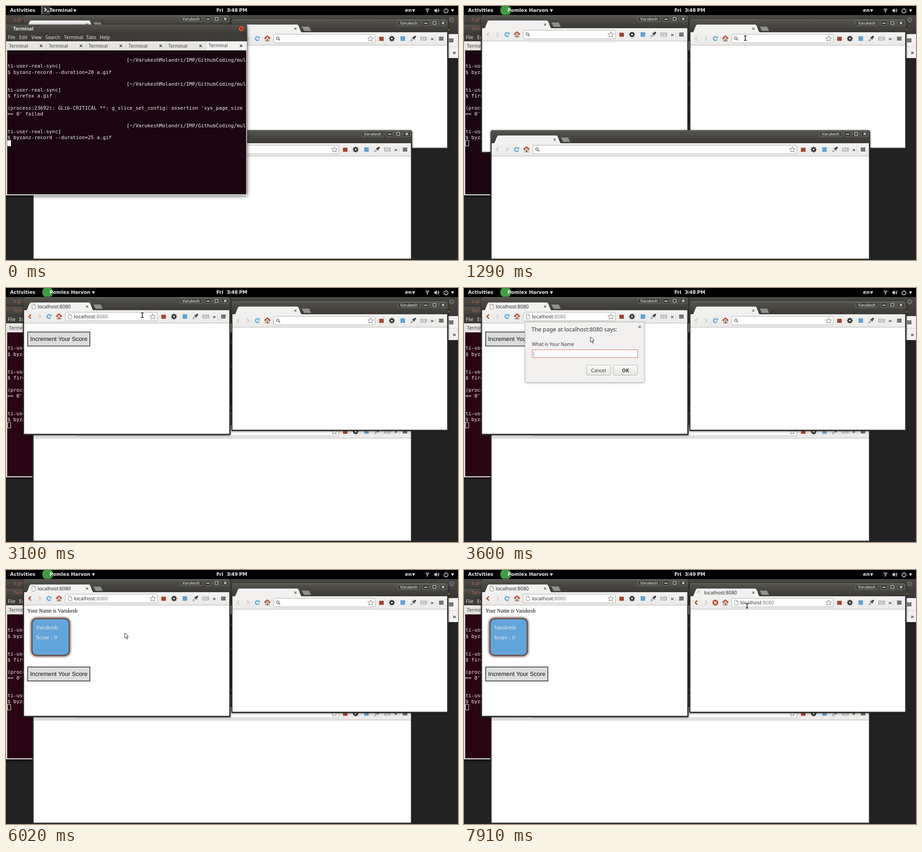
Animation of 998x561 px, one loop 7.99 s. Source, as an HTML page with a canvas:

```html
<!DOCTYPE html>
<html lang="en">
<head>
<meta charset="utf-8">
<title>Desktop recording</title>
<style>
html, body { margin: 0; width: 100%; height: 100%; overflow: hidden; background: #222; }
canvas { display: block; width: 100vw; height: 100vh; }
</style>
</head>
<body>
<canvas id="stage" width="998" height="561"></canvas>
<script>
const c = document.getElementById('stage').getContext('2d');
const LOOP = 7990;
const USER = 'Varukesh', APP = 'Pomlex Harvon';
const UI = '"Noto Sans", "Open Sans", sans-serif';
const BAR = 'bold 10.6px "DejaVu Sans", sans-serif';
const MONO = '10.93px "DejaVu Sans Mono", monospace';
const SERIF = '"Liberation Serif", serif';
const DARK = '#3c3b37', LIGHT = '#f2f1f0', ORANGE = '#b9512b';

// Moments of the story, in ms
const T = { raise: 400, clickRight: 1380, clickLeft: 2520, suggest: 2740, load: 3100, ask: 3180,
  minute: 4390, close: 5450, card: 5510, focusRight: 7000, suggestRight: 7430, loadRight: 7710 };
const KEYS = [4540, 4690, 4890, 4950, 5010, 5070, 5130, 5190];
const POINTER = [[890, 606, 230], [1290, 621, 71], [1780, 621, 71], [2400, 301, 61], [2560, 301, 60],
  [3470, 301, 60], [3680, 266, 137], [3880, 266, 137], [4080, 263, 142], [5450, 263, 142],
  [5500, 262, 139], [6050, 262, 139], [6180, 571, 93], [6390, 571, 93], [6760, 622, 71], [7050, 625, 79]];

const ramp = (t, a, b) => Math.min(1, Math.max(0, (t - a) / (b - a)));

function rect(x, y, w, h, fill, stroke) {
  if (fill) { c.fillStyle = fill; c.fillRect(x, y, w, h); }
  if (stroke) { c.strokeStyle = stroke; c.lineWidth = 1; c.strokeRect(x + .5, y + .5, w - 1, h - 1); }
}
function round(x, y, w, h, r, fill, stroke, width = 1) {
  c.beginPath(); c.roundRect(x, y, w, h, r);
  if (fill) { c.fillStyle = fill; c.fill(); }
  if (stroke) { c.strokeStyle = stroke; c.lineWidth = width; c.stroke(); }
}
function text(s, x, y, font, color, align = 'left') {
  c.font = font; c.fillStyle = color; c.textAlign = align;
  c.fillText(s, x, y);
}
function path(points, stroke, width, fill) {
  c.beginPath();
  for (let i = 0; i < points.length; i += 2) c.lineTo(points[i], points[i + 1]);
  if (fill) { c.closePath(); c.fillStyle = fill; c.fill(); }
  if (stroke) { c.strokeStyle = stroke; c.lineWidth = width; c.stroke(); }
}
function arc(x, y, r, a, b, stroke, width) {
  c.beginPath(); c.arc(x, y, r, a, b); c.strokeStyle = stroke; c.lineWidth = width; c.stroke();
}
function disc(x, y, r, fill) {
  c.beginPath(); c.arc(x, y, r, 0, 7); c.fillStyle = fill; c.fill();
}
function cross(x, y, r, color, width = 1.4) {
  path([x - r, y - r, x + r, y + r], color, width);
  path([x - r, y + r, x + r, y - r], color, width);
}
function vertical(y, h, top, bottom) {
  const g = c.createLinearGradient(0, y, 0, y + h);
  g.addColorStop(0, top); g.addColorStop(1, bottom);
  return g;
}
function shadowed(color, blur, dy, draw) {
  c.save();
  c.shadowColor = color; c.shadowBlur = blur; c.shadowOffsetY = dy;
  draw();
  c.restore();
}
function at(x, y, draw) { c.save(); c.translate(x, y); draw(); c.restore(); }
function menuLines(x, y) { for (const d of [-4, -1, 2]) rect(x - 5, y + d, 10, 2, '#3b3b3b'); }
const triangle = (x, y, color) => path([x - 3.5, y - 2.5, x + 3.5, y - 2.5, x, y + 3.5], null, 0, color);

function pageIcon(x, y) {
  path([x - 3.5, y - 5.5, x + 1, y - 5.5, x + 4, y - 2.5, x + 4, y + 5.5, x - 3.5, y + 5.5, x - 3.5, y - 5.5], '#8d8d8d', 1, '#fff');
  path([x + 1, y - 5.5, x + 1, y - 2.5, x + 4, y - 2.5], '#8d8d8d', 1);
}
function star(x, y) {
  const p = [];
  for (let i = 0; i <= 10; i++) {
    const r = i % 2 ? 3 : 6.8, a = i * Math.PI / 5 - Math.PI / 2;
    p.push(x + r * Math.cos(a), y + r * Math.sin(a));
  }
  path(p, '#777', 1, '#fff');
}
function gear(x, y) {
  for (let i = 0; i < 8; i++) at(x, y, () => { c.rotate(i * Math.PI / 4); rect(-1.3, -6.3, 2.6, 3, '#2e2e2e'); });
  arc(x, y, 3.3, 0, 7, '#2e2e2e', 2.6);
}
function dropper(x, y) {
  at(x, y, () => {
    c.rotate(Math.PI / 4);
    round(-1.6, -1, 3.2, 8, 1.5, '#b9cfe2', '#667785', .8);
    rect(-3.4, -2.6, 6.8, 2, '#333');
    round(-2, -8, 4, 6, 2, '#3b4148');
  });
}
function home(x, y) {
  rect(x - 4.5, y - 1, 9, 7, '#f1e2d3', '#87766b');
  rect(x - 1.2, y + 1.5, 2.8, 4.5, '#8a5038');
  path([x - 6.5, y, x, y - 5.5, x + 6.5, y], '#bb4727', 2.6);
}
function reload(x, y) {
  arc(x, y, 4.2, .5, 5.2, '#5aa7dc', 2.5);
  path([x + .5, y - .5, x + 5.5, y - .5, x + 5.5, y - 6], null, 0, '#5aa7dc');
}
function address(x, y, size) {
  text('localhost', x, y, `${size}px ${UI}`, '#2a2a2a');
  text(':8080', x + c.measureText('localhost').width, y, `${size}px ${UI}`, '#7c7c7c');
}

function suggestions(w) {
  rect(2, 57, w - 4, 121, '#fff');
  rect(2, 58, w - 4, 24, '#e8e6e4');
  for (let i = 0; i < 5; i++) {
    pageIcon(103, 70 + i * 24);
    address(112, 74 + i * 24, 11);
  }
  rect(2, 177, w - 4, 1, '#c4c4c4');
}

// s: { url, title, loading, caret, suggest, page }
function browser(x, y, w, h, s, t) {
  at(x, y, () => {
    shadowed('rgba(0,0,0,.5)', 4, 1, () => round(-.5, 0, w + 1.5, h + 1, [5, 5, 2, 2], '#343330'));
    round(0, 0, w, 30, [5, 5, 0, 0], vertical(0, 30, '#55544d', '#393834'));
    rect(4, 1, w - 8, 1, '#6b6a64');
    rect(2, 29, w - 4, h - 31, '#fff');

    c.beginPath();
    c.moveTo(6, 30);
    c.bezierCurveTo(11, 28, 12, 13, 17, 12);
    c.lineTo(145, 12);
    c.bezierCurveTo(150, 13, 151, 28, 156, 30);
    c.fillStyle = LIGHT; c.fill();
    path([155, 16.5, 171, 16.5, 175.5, 26, 160, 26, 155, 16.5], '#6f6e69', 1, '#92918d');
    cross(141, 21, 2.3, '#666');
    if (s.title) {
      if (s.loading) arc(23.5, 19.5, 4, t / 150, t / 150 + 1.7, '#aaa', 1.6);
      else pageIcon(23, 21);
      text('localhost:8080', 32, 25, `10.77px ${UI}`, '#2c2c2c');
    }

    round(w - 111, 3, 49, 11.5, 2, '#42413c', '#85847c', .8);
    text(USER, w - 86.5, 12, `8.8px ${UI}`, '#f2f2ee', 'center');
    for (const d of [49, 30, 11]) round(w - d - 7.5, 3, 15, 11.5, 2, '#403f3a', '#85847c', .8);
    rect(w - 52.5, 8.5, 7, 1.5, '#eee');
    rect(w - 34, 5, 8, 7, null, '#eee');
    cross(w - 11, 8.5, 2.7, '#eee', 1.3);

    rect(2, 29, w - 4, 28, vertical(29, 28, LIGHT, '#ebeae8'));
    rect(2, 57, w - 4, 1, '#b3b1ae');
    path([17, 38.5, 12.5, 43, 17, 47.5], s.title ? ORANGE : '#d3d2d0', 2.6);
    path([34, 38.5, 38.5, 43, 34, 47.5], '#d3d2d0', 2.6);
    if (s.loading) { disc(57, 43, 6.5, ORANGE); cross(57, 43, 2.5, '#fff', 1.8); }
    else reload(57, 43);
    home(79, 43);
    round(93, 33.5, w - 254, 19, 2, '#fff', '#b0aeab');
    if (s.url) {
      pageIcon(103, 43);
      address(112, 47, 11.06);
    } else {
      arc(102, 42, 2.8, 0, 7, '#777', 1.6);
      path([104, 44, 107, 47], '#777', 2);
    }
    if (s.caret) rect(112, 37, 1, 12, '#222');
    star(w - 171, 43.5);
    rect(w - 152, 39, 10, 9, '#a9442e');
    gear(w - 124, 43);
    rect(w - 105, 38, 10, 10, '#5fa3d3');
    dropper(w - 77, 43);
    rect(w - 61, 39, 14, 8, '#fafafa', '#8c8c8c');
    text('DEB', w - 54, 45.4, `6px ${UI}`, '#666', 'center');
    text('»', w - 35, 46.5, `bold 11px ${UI}`, '#444', 'center');
    rect(w - 28.5, 38, 1, 11, '#d0cfcd');
    menuLines(w - 15, 43);
    if (s.page) s.page();
    if (s.suggest) suggestions(w);
  });
}

function scoreButton(y) {
  rect(9, y, 139, 32.5, '#ddd');
  c.strokeStyle = '#333'; c.lineWidth = 1.6;
  c.strokeRect(9.8, y + .8, 137.4, 30.9);
  text('Increment Your Score', 78.5, y + 20.5, '13.15px "Liberation Sans", sans-serif', '#111', 'center');
}
function scorePage(t) {
  if (t < T.card) return scoreButton(76.5);
  text('Your Name is ' + USER, 9, 73.5, '11.69px ' + SERIF, '#000');
  for (let i = 0; i < 2; i++) shadowed('#54281a', 6, 0, () => round(19, 87, 83, 82, 10, '#5b3a30'));
  round(20.5, 88.5, 80, 79, 9, '#62a5da');
  text(USER, 28, 111, '13.15px ' + SERIF, '#f3ebdc');
  text('Score : 0', 28, 133, '13.15px ' + SERIF, '#f3ebdc');
  scoreButton(193.5);
}

function dialog(t) {
  const alpha = ramp(t, T.ask, 3340) * (1 - ramp(t, T.close, 5600));
  if (!alpha) return;
  c.save();
  c.globalAlpha = alpha;
  shadowed('rgba(0,0,0,.35)', 4, 1, () => round(135, 75, 263, 133.5, 2, LIGHT));
  round(135, 75.5, 263, 133, 2, null, '#b8b6b3', .8);
  cross(388, 86, 2.4, '#666');
  text('The page at localhost:8080 says:', 149, 96, `12.5px ${UI}`, '#333');
  text('What is Your Name', 150, 128, `10.4px ${UI}`, '#333');
  rect(150, 136, 234, 18, '#fff', '#cf7350');
  const typed = USER.slice(0, KEYS.filter(k => t >= k).length);
  text(typed, 153, 149, `10.4px ${UI}`, '#333');
  if (t > 3480) rect(153.5 + c.measureText(typed).width, 140, 1, 11, '#777');
  for (const [x, label, weight] of [[270, 'Cancel', ''], [329.5, 'OK', 'bold ']]) {
    round(x + .5, 170.5, 53, 22, 3, vertical(170, 22, '#fcfcfb', '#e6e5e3'), '#b5b3b0');
    text(label, x + 27, 185.5, `${weight}10.6px ${UI}`, '#333', 'center');
  }
  c.restore();
}

function terminal(t) {
  const active = t < T.raise;
  shadowed('rgba(0,0,0,.6)', 9, 2, () => round(-4, 41, 536.5, 377, 4, DARK));
  rect(0, 41, 532, 19, vertical(41, 19, '#53524b', '#3c3b37'));
  text('Terminal', 16, 54, `${active ? 'bold ' : ''}10.1px ${UI}`, active ? '#efeee8' : '#b0604c');
  disc(519.5, 50, 6.3, '#6b2c1a');
  disc(519.5, 50, 5.5, '#d9603a');
  cross(519.5, 50, 2.3, '#57210f', 1.5);
  rect(0, 60, 532, 18, DARK);
  [['File', 4], ['Edit', 29], ['View', 56], ['Search', 87], ['Terminal', 128], ['Tabs', 177], ['Help', 207]]
    .forEach(([s, x]) => text(s, x, 73, `10.4px ${UI}`, '#e6e4dc'));
  rect(0, 78, 532, 340, LIGHT);
  rect(0, 78, 440, 20, vertical(78, 20, '#eceae8', '#e2e0de'));
  for (let i = 0; i < 6; i++) {
    const up = i === 5;
    text('Terminal', 6.5 + i * 88 + (up ? 1 : 0), up ? 91 : 92, `10.3px ${UI}`, '#444');
    cross(77.5 + i * 88 + (up ? 1.5 : 0), 88, 2.5, '#333', 1.5);
    if (i) rect(i * 88, 79, 1, 19, '#c9c7c4');
  }
  rect(2.5, 98, 528, 318, t < 1430 ? '#1b0511' : '#2a0514');
  const dir = ' '.repeat(40) + '[~/' + USER + 'Molandri/IMP/GithubCoding/mul';
  const tail = 'ti-user-real-sync]';
  ['', dir, tail, '$ byzanz-record --duration=20 a.gif', '', dir, tail, '$ firefox a.gif', '',
    "(process:23692): GLib-CRITICAL **: g_slice_set_config: assertion 'sys_page_size", "== 0' failed", '',
    dir, tail, '$ byzanz-record --duration=25 a.gif']
    .forEach((line, i) => text(line, 3.2, 110 + i * 13.17, MONO, '#f4f1f3'));
  rect(3, 296.5, 8, 13, active ? '#fff' : null, active ? null : '#eee');
}

function backdrop() {
  rect(0, 0, 998, 561, '#232323');
  rect(0, 20, 998, 42, vertical(20, 42, '#494843', '#393834'));
  text('a.gif', 16, 33, `10.4px ${UI}`, '#b0604c');
  disc(984, 30.5, 5.5, '#6d6c67');
  cross(984, 30.5, 2.2, '#3c3b37');
  rect(977, 51, 2, 3, '#c8a13a');
  rect(0, 62, 998, 53, LIGHT);
  rect(0, 89, 998, 1, '#d5d3d0');
  menuLines(983, 76);
  text('»', 990, 107, `bold 12px ${UI}`, '#444', 'center');
}

function topBar(t) {
  rect(0, 0, 998, 20, '#000');
  const ink = '#e8e8e8', k = ramp(t, T.raise, 710);
  text('Activities', 9, 13, BAR, ink);
  c.save();
  c.beginPath(); c.rect(78, 0, 300, 19.5); c.clip();
  c.globalAlpha = 1 - k;
  rect(79, 0, 19, 19, '#34393b');
  rect(78, 0, 2, 19, '#888');
  path([85, 4.5, 89, 8, 85, 11.5], '#fff', 1.8);
  rect(90, 11, 6, 1.5, '#fff');
  text('Terminal', 96, 13, BAR, ink);
  triangle(152, 10, ink);
  c.globalAlpha = k;
  disc(92, 9.5, 12, '#3f9c45');
  text(APP, 96, 13, BAR, ink);
  triangle(193, 10, ink);
  c.restore();
  // The clock is set with narrow gaps around its colon
  [['Fri', 464.5], ['3', 487.3], [':', 493.6], [t < T.minute ? '48' : '49', 497.2], ['PM', 514.5]]
    .forEach(([s, x]) => text(s, x, s === ':' ? 12 : 13, BAR, ink));
  text('en', 881, 13, BAR, ink);
  triangle(900, 10, ink);
  for (const r of [2.5, 5, 7.5]) arc(930.5, 13, r, -2.3, -.84, r > 6 ? '#777' : ink, 1.3);
  disc(930.5, 13, 1.2, ink);
  path([946, 8, 948, 8, 951, 5, 951, 15, 948, 12, 946, 12], null, 0, ink);
  for (const r of [2.5, 5]) arc(951, 10, r, -.9, .9, ink, 1.2);
  arc(971.5, 10.5, 4.5, -1, 4.14, ink, 1.5);
  rect(970.8, 4, 1.5, 6, ink);
  triangle(986, 10, ink);
}

function pointer(t) {
  if (t < POINTER[0][0]) return;
  let i = POINTER.findIndex(p => p[0] > t);
  if (i < 0) i = POINTER.length;
  const a = POINTER[i - 1], b = POINTER[i] || a, k = a === b ? 0 : (t - a[0]) / (b[0] - a[0]);
  const x = a[1] + (b[1] - a[1]) * k, y = a[2] + (b[2] - a[2]) * k;
  const over = (l, top, r, bottom) => x > l && x < r && y > top && y < bottom;
  const beam = over(131, 53, 334, 73) || over(590, 62, 815, 82) ||
    (t > 3340 && t < T.close && over(150, 136, 384, 154));
  at(x, y, () => {
    if (beam) {
      for (const [color, g] of [['#fff', .8], ['#111', 0]]) {
        rect(-.8 - g, -5 - g, 1.6 + 2 * g, 10 + 2 * g, color);
        rect(-3 - g, -5.7 - g, 6 + 2 * g, 1.4 + 2 * g, color);
        rect(-3 - g, 4.3 - g, 6 + 2 * g, 1.4 + 2 * g, color);
      }
    } else path([0, 0, 0, 11.5, 2.7, 9, 4.7, 13.7, 6.7, 12.8, 4.8, 8.3, 8.3, 8.3, 0, 0], '#222', 1, '#fff');
  });
}

function draw(t) {
  const left = () => browser(38, 20, 457, 304, {
    url: t >= T.suggest, title: t >= T.load, caret: t > T.clickLeft && t < T.suggest,
    suggest: t >= T.suggest && t < T.load, page: t >= T.load && (() => scorePage(t))
  }, t);
  const right = () => browser(498, 29, 478, 286, {
    url: t >= T.suggestRight, title: t >= T.loadRight, loading: t >= T.loadRight,
    caret: (t > T.clickRight && t < T.clickLeft) || (t > T.focusRight && t < T.suggestRight),
    suggest: t >= T.suggestRight && t < T.loadRight
  }, t);
  const bottom = () => browser(59, 274, 837, 286, {}, t);
  const shell = () => terminal(t);

  backdrop();
  const stack = t < T.raise ? [left, right, bottom, shell]
    : t < T.clickRight ? [shell, left, right, bottom]
    : t < T.clickLeft ? [shell, left, bottom, right]
    : [shell, bottom, right, left];
  stack.forEach(paint => paint());
  dialog(t);
  topBar(t);
  pointer(t);
}

function tick() {
  draw(performance.now() % LOOP);
  requestAnimationFrame(tick);
}
tick();
</script>
</body>
</html>
```
